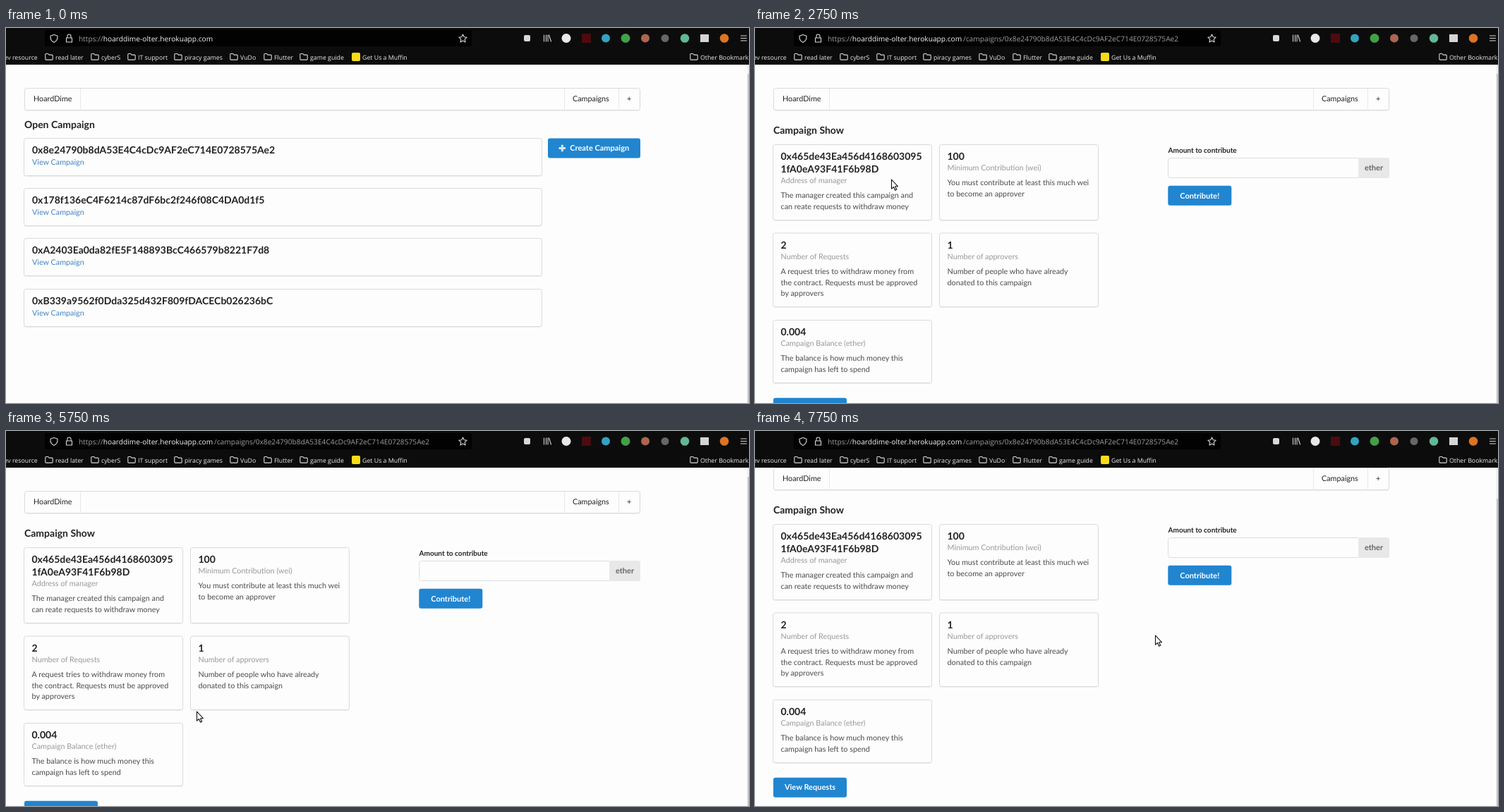
Write an HTML page that moves like this. It is 1053 by 532 pixels and loops after 8 s.

```html
<!DOCTYPE html>
<html lang="en">
<head>
<meta charset="utf-8">
<title>Campaigns</title>
<style>
html, body { margin: 0; width: 100%; height: 100%; overflow: hidden; background: #fdfdfd; }
svg { display: block; }
text { font: 10.8px Lato, sans-serif; text-rendering: geometricPrecision; fill: #222; white-space: pre; }
.head { font-size: 14px; font-weight: 700; }
.meta { fill: #999; }
.desc { fill: #4c4c4c; }
.link { fill: #4183c4; }
.link.hover { fill: #1e70bf; }
.label { font-size: 10.07px; font-weight: 700; }
.button, .ether { font-size: 11px; font-weight: 700; text-anchor: middle; }
.button { fill: #fff; }
.ether { fill: #666; }
.url { font: 10.2px "Open Sans", sans-serif; fill: #a0a0a4; }
.url .host { fill: #f4f4f6; }
.mark { font: 8.8px "Open Sans", sans-serif; fill: #ececee; }
.icon { fill: none; stroke: #d8d8dc; stroke-width: 1.1; stroke-linejoin: round; stroke-linecap: round; }
</style>
</head>
<body>
<svg id="stage" width="1053" height="532" viewBox="0 0 1053 532"></svg>
<script>
const LOOP = 8000, STEP = 250, OPEN_AT = 2250, SCROLL_AT = 6000, SCROLL = 33;

const text = (x, y, s, cls = "") => `<text x="${x}" y="${y}" class="${cls}">${s}</text>`;
const box = (x, y, w, h, fill, r = 0, extra = "") =>
  `<rect x="${x}" y="${y}" width="${w}" height="${h}" rx="${r}" fill="${fill}" ${extra}/>`;
const dot = (x, y, r, fill) => `<circle cx="${x}" cy="${y}" r="${r}" fill="${fill}"/>`;
const icon = d => `<path class="icon" d="${d}"/>`;
const panel = (x, y, w, h) =>
  box(x, y + 1, w, h, "#eee", 3, 'stroke="#eeeeef"') +
  box(x, y, w, h, "#fdfdfd", 3, 'stroke="#dadadb"');
const button = (x, y, w, s, shift = 0) =>
  box(x, y, w, 28, "#2185d0", 3) + text(x + w / 2 + shift, y + 17.7, s, "button");

function chrome() {
  const folders = [[55, "read later"], [120, "cyberS"], [172, "IT support"], [238, "piracy games"],
    [317, "VuDo"], [365, "Flutter"], [416, "game guide"], [969, "Other Bookmarks"]];
  const folder = ([x, s]) =>
    icon(`M${x + .8} 37.5q0-1 1-1h3l1.4 1.6h4q1 0 1 1v5q0 1-1 1h-8.4q-1 0-1-1z`) + text(x + 15, 44.5, s, "mark");
  return box(0, 0, 1053, 52, "#0c0c0d") + box(55, 3, 605, 23, "#020203", 3) +
    icon("M68 9.5l5 1.7c.3 4-1 7.5-5 9.3c-4-1.8-5.3-5.3-5-9.3z") +
    icon("M85.5 14h8v6h-8zM87 14v-2.5a2.5 2.5 0 0 1 5 0v2.5") +
    icon("M647.5 9l1.7 3.7 4 .5-3 2.7.8 4-3.5-2-3.5 2 .8-4-3-2.7 4-.5z") +
    `<text class="url" x="103" y="18.6">https://<tspan class="host">hoarddime-olter.herokuapp.com</tspan></text>` +
    `<text id="path" class="url" x="295" y="18.6">/campaigns/0x8e24790b8dA53E4C4cDc9AF2eC714E0728575Ae2</text>` +
    box(734, 10, 9, 9, "#d8d8dc", 2) +
    icon("M762.5 10v9M765.5 10v9M768 10v9M769.5 10l3 9") +
    dot(794, 14.5, 6.5, "#e9e9ea") + box(816, 8, 13, 13, "#4c0b0f") + dot(850, 14.5, 6, "#32a3c0") +
    dot(878, 14.5, 6.5, "#43a047") + dot(906, 14.5, 6, "#ad6550") + dot(934, 14.5, 5.5, "#66666a") +
    dot(962, 14.5, 6.3, "#62b895") + box(984, 9, 12, 11, "#d5d5d7") + dot(1018, 14.5, 6.3, "#dd7424") +
    icon("M1041.5 11h8M1041.5 14.5h8M1041.5 18h8") +
    text(-2.5, 44.5, "ev resource", "mark") + folders.map(folder).join("") +
    box(490, 35, 12, 12, "#f7dc18", 2) + text(505, 44.5, "Get Us a Muffin", "mark");
}

function menu() {
  const divider = x => box(x, 86, 1, 31, "#e8e8e9");
  return panel(26.5, 85.5, 872, 31) + [105, 791, 868].map(divider).join("") +
    text(39, 104.4, "HoardDime") + text(803, 104.4, "Campaigns") + text(880, 104.4, "+");
}

function listPage() {
  const campaigns = ["0x8e24790b8dA53E4C4cDc9AF2eC714E0728575Ae2", "0x178f136eC4F6214c87dF6bc2f246f08C4DA0d1f5",
    "0xA2403Ea0da82fE5F148893BcC466579b8221F7d8", "0xB339a9562f0Dda325d432F809fDACECb026236bC"];
  const row = (address, i) => {
    const y = Math.round(156 + i * 71.2);
    return panel(25.5, y + .5, 734, 53) + text(37, y + 22.3, address, "head") +
      text(37, y + 38, "View Campaign", "link");
  };
  return text(26, 142, "Open Campaign", "head") + campaigns.map(row).join("") +
    button(768, 156.5, 131, "Create Campaign", 7.7) +
    box(783.5, 169, 9.5, 3, "#d3e7f6", .5) + box(786.8, 165.7, 3, 9.5, "#d3e7f6", .5);
}

function card(x, y, h, heads, meta, lines) {
  const metaY = y + 22 + (heads.length - 1) * 18 + 15.4;
  return panel(x + .5, y + .5, 225, h) +
    heads.map((s, i) => text(x + 11.5, y + 22 + i * 18, s, "head")).join("") +
    text(x + 11.5, metaY, meta, "meta") +
    lines.map((s, i) => text(x + 11.5, metaY + 21 + i * 15.6, s, "desc")).join("");
}

function showPage() {
  return text(26, 150, "Campaign Show", "head") +
    card(25, 165, 107, ["0x465de43Ea456d4168603095", "1fA0eA93F41F6b98D"], "Address of manager",
      ["The manager created this campaign and", "can reate requests to withdraw money"]) +
    card(261, 165, 107, ["100"], "Minimum Contribution (wei)",
      ["You must contribute at least this much wei", "to become an approver"]) +
    card(25, 290.5, 104.5, ["2"], "Number of Requests",
      ["A request tries to withdraw money from", "the contract. Requests must be approved", "by approvers"]) +
    card(261, 290.5, 104.5, ["1"], "Number of approvers",
      ["Number of people who have already", "donated to this campaign"]) +
    card(25, 414, 89, ["0.004"], "Campaign Balance (ether)",
      ["The balance is how much money this", "campaign has left to spend"]) +
    text(585.5, 177.4, "Amount to contribute", "label") +
    box(585.5, 184.5, 272, 28, "#fdfdfd", 3, 'stroke="#dedede"') +
    box(855, 184, 44, 29, "#e8e8e8", 3) + text(877, 202, "ether", "ether") +
    button(585.3, 223.8, 90, "Contribute!") + button(26, 524.7, 104, "View Requests");
}

const $ = id => document.getElementById(id);
$("stage").innerHTML = `
  <g id="page">${menu()}<g id="list">${listPage()}</g><g id="show">${showPage()}</g></g>
  ${box(1050, 52, 3, 480, "#f1f1f1")}<rect id="thumb" x="1051" width="2" height="480" fill="#c6c6c8"/>
  ${chrome()}
  <g id="cursor" fill="#fff" stroke="#111" stroke-width="1.1" stroke-linejoin="round">
    <path id="arrow" d="M.5 0v13.2l3-2.7 2.1 4.7 2.100-.9-2.100-4.600h3.800z"/>
    <path id="hand" d="M-1.500 9V.5q0-1.7 1.4-1.7t1.4 1.7v5q2-.7 2.5.7q2-.5 2.3 1q1.900-.3 1.900 1.5v4q0 2-1.500 3.5v2h-6.500v-1.700l-4-5.500q-1.700-2.500-.2-2.600q1-.1 2.700 2z"/>
  </g>`;
const link = document.querySelector(".link");

// Pointer stops: time, x, y
const stops = [[0, 340, -30], [500, 310, -20], [1250, 84, 188], [1500, 78, 190], [2250, 79, 191], [2750, 193, 215],
  [3750, 541, 523], [4000, 560, 545], [5000, 440, 545], [5750, 270, 398], [6250, 290, 387], [7750, 567, 290], [LOOP, 567, 290]];

function pointer(t) {
  const i = stops.findIndex(s => s[0] > t), [t0, x0, y0] = stops[i - 1], [t1, x1, y1] = stops[i];
  const k = (t - t0) / (t1 - t0);
  return [x0 + (x1 - x0) * k, y0 + (y1 - y0) * k];
}

const show = (id, on) => $(id).setAttribute("visibility", on ? "visible" : "hidden");

function draw(now) {
  const t = Math.floor(now % LOOP / STEP) * STEP;
  const opened = t >= OPEN_AT, scroll = t >= SCROLL_AT ? SCROLL : 0, hover = t >= 1250 && !opened;
  show("list", !opened);
  show("show", opened);
  show("path", opened);
  show("hand", hover);
  show("arrow", !hover);
  link.classList.toggle("hover", hover);
  $("page").setAttribute("transform", `translate(0 ${-scroll})`);
  $("thumb").setAttribute("y", scroll ? 96 : 65);
  $("cursor").setAttribute("transform", `translate(${pointer(t)})`);
  requestAnimationFrame(draw);
}
requestAnimationFrame(draw);
</script>
</body>
</html>
```
